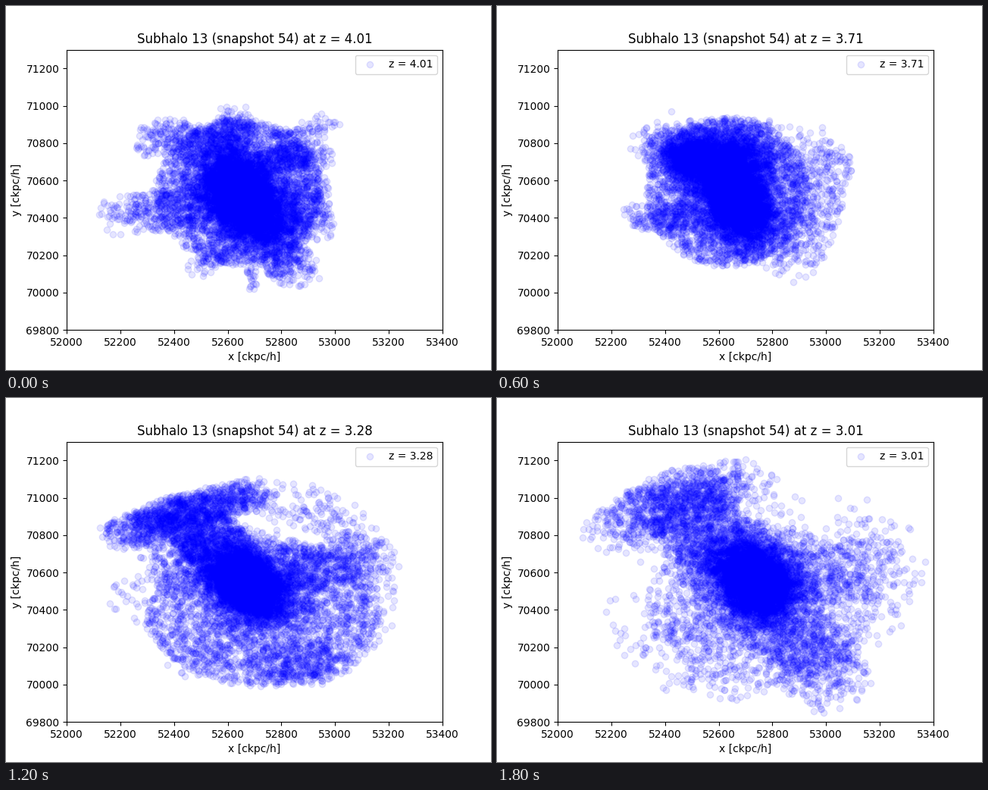
A matplotlib script that plays this animation: 640x480 px, repeating every 2.4 s.

```python
import numpy as np
import matplotlib.pyplot as plt
from matplotlib.animation import FuncAnimation

plt.rcParams["text.kerning_factor"] = 6  # whole-pixel letter spacing

CORNER = np.array([52000, 70000])
REDSHIFTS = (4.01, 3.71, 3.28, 3.01)
rng = np.random.default_rng(13)


def disc(count, power=0.5):
    """Random points in the unit disc; a higher power crowds the centre."""
    angle = rng.uniform(0, 2 * np.pi, count)
    radius = rng.uniform(0, 1, count) ** power
    return np.column_stack([radius * np.cos(angle), radius * np.sin(angle)])


def core(center, spread, count, tilt=-0.25):
    x, y = rng.normal(size=(2, count))
    y = tilt * x + np.sqrt(1 - tilt ** 2) * y
    return center + np.column_stack([x, y]) * spread


def halo(center, radius, count):
    return center + disc(count, 0.65) * radius


def stream(path, width, count):
    """Scatter points evenly along a path, within a round brush."""
    path = np.array(path)
    steps = np.hypot(*np.diff(path, axis=0).T)
    stops = np.append(0, np.cumsum(steps))
    along = rng.uniform(0, stops[-1], count)
    line = np.column_stack([np.interp(along, stops, axis) for axis in path.T])
    return line + disc(count) * width


def cloud(*parts):
    return CORNER + np.vstack(parts)


clouds = [
    cloud(
        core((640, 540), (70, 108), 4500),
        core((725, 400), (75, 95), 1400),
        halo((640, 540), (310, 390), 3000),
        stream([(600, 750), (630, 930)], 80, 240),
        stream([(560, 770), (390, 850), (320, 800)], 95, 330),
        stream([(500, 460), (300, 440), (210, 410)], 115, 370),
        stream([(750, 720), (930, 740)], 75, 330),
        stream([(800, 800), (960, 900)], 60, 90),
        stream([(880, 620), (920, 340)], 90, 290),
        stream([(770, 250), (860, 110)], 100, 260),
        stream([(600, 250), (490, 130)], 55, 80),
        stream([(680, 180), (695, 15)], 20, 25),
    ),
    cloud(
        core((672, 470), (68, 104), 3800),
        core((530, 700), (74, 68), 2300),
        core((690, 720), (75, 75), 900),
        halo((630, 540), (300, 400), 2800),
        stream([(480, 420), (290, 400)], 75, 210),
        stream([(350, 800), (560, 830), (760, 830)], 100, 380),
        stream([(900, 800), (980, 700), (930, 420), (860, 170)], 125, 520),
    ),
    cloud(
        core((660, 555), (60, 76), 3500),
        core((700, 520), (95, 110), 2100),
        halo((730, 390), (430, 400), 2600),
        stream([(200, 800), (420, 930), (700, 1020)], 90, 1200),
        stream([(450, 900), (600, 680)], 140, 1150),
        stream([(360, 800), (460, 540)], 130, 330),
        stream([(850, 600), (1110, 690)], 130, 420),
        stream([(760, 1000), (980, 920), (1130, 620), (1110, 340), (960, 100)],
               120, 380),
        stream([(700, 110), (960, 110)], 110, 300),
        stream([(230, 550), (380, 250), (530, 120)], 120, 100),
    ),
    cloud(
        core((740, 555), (68, 95), 3700),
        core((715, 575), (118, 150), 2500),
        halo((760, 420), (430, 430), 1200),
        stream([(220, 820), (420, 1010), (700, 1080)], 135, 850),
        stream([(450, 1000), (580, 720)], 180, 950),
        stream([(850, 600), (1210, 620)], 180, 430),
        stream([(800, 330), (960, 180), (1000, 0)], 170, 700),
        stream([(330, 350), (480, 130), (760, 90)], 190, 200),
        stream([(950, 900), (1170, 860), (1250, 600), (1150, 250)], 140, 90),
    ),
]

fig, ax = plt.subplots(figsize=(6.4, 4.8), dpi=100)
ax.set(xlim=(52000, 53400), ylim=(69800, 71300),
       xlabel="x [ckpc/h]", ylabel="y [ckpc/h]")
dots = ax.scatter(*clouds[0].T, color="blue", alpha=0.1,
                  label=f"z = {REDSHIFTS[0]:.2f}")
legend = ax.legend(loc="upper right")
title = ax.set_title("")


def update(i):
    label = f"z = {REDSHIFTS[i]:.2f}"
    dots.set_offsets(clouds[i])
    title.set_text(f"Subhalo 13 (snapshot 54) at {label}")
    legend.get_texts()[0].set_text(label)
    return dots, title, legend


anim = FuncAnimation(fig, update, frames=len(clouds), interval=600,
                     repeat=True, repeat_delay=0)
plt.show()
```
